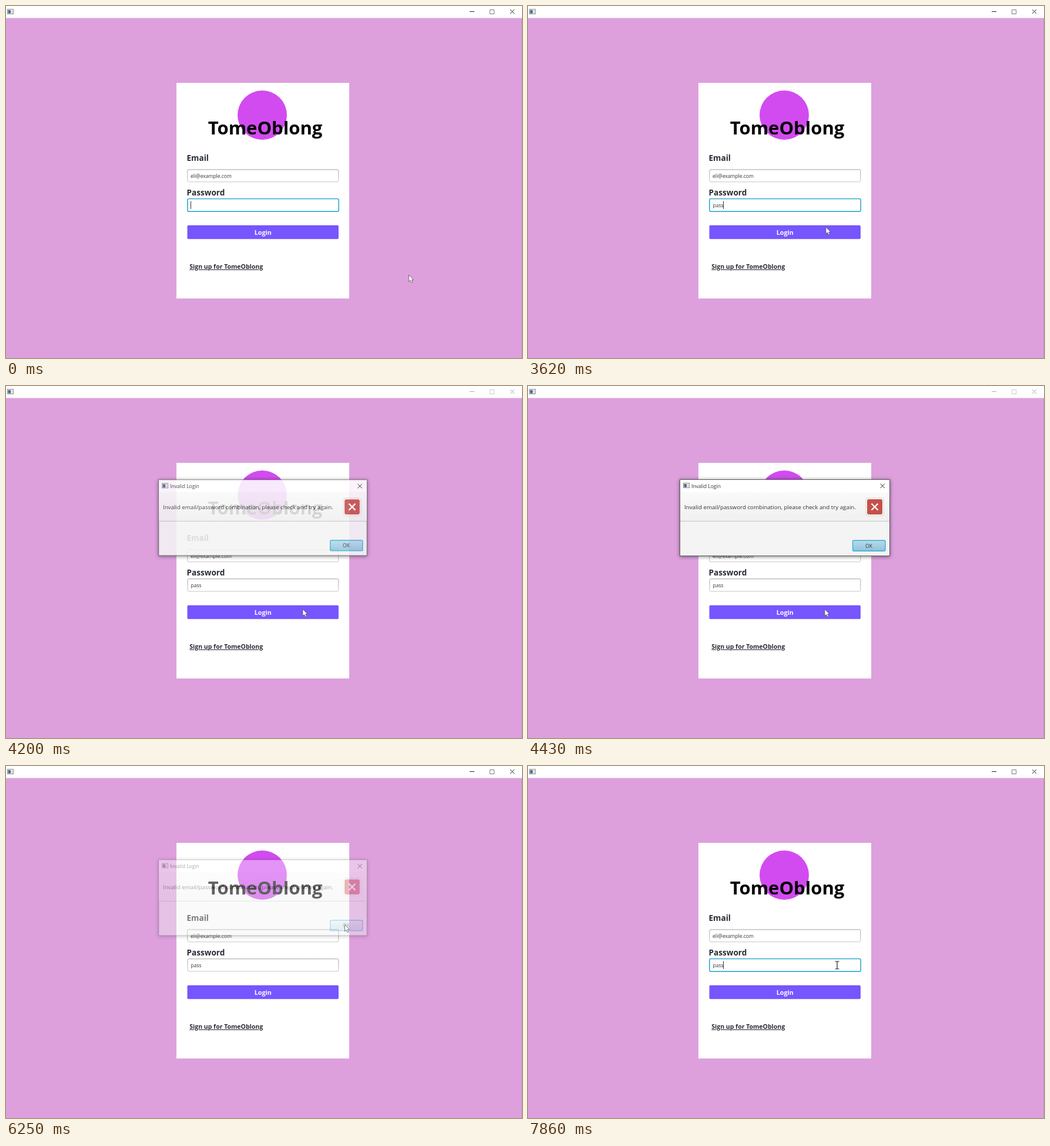
An HTML page that plays this animation: 878 by 600 pixels, repeating every 8 s.

```html
<!DOCTYPE html>
<html lang="en">
<head>
<meta charset="utf-8">
<title>Login</title>
<style>
  html, body { margin: 0; width: 100%; height: 100%; overflow: hidden; background: #dda0dd; }
  svg { display: block; width: 878px; height: 600px; font-family: "Open Sans", "Noto Sans", sans-serif; }
  .bold { font-weight: 700; fill: #282c34; }
  .small { font-size: 8.5px; fill: #333; }
  .line { fill: none; stroke: #222; }
  #dialog { filter: drop-shadow(0 1px 3px rgba(0, 0, 0, .5)); }
</style>
</head>
<body>
<svg viewBox="0 0 878 600">
  <defs>
    <linearGradient id="head" x2="0" y2="1">
      <stop stop-color="#fafafa"/><stop offset="1" stop-color="#f0f0f0"/>
    </linearGradient>
    <linearGradient id="okIdle" x2="0" y2="1">
      <stop stop-color="#b5dcea"/><stop offset="1" stop-color="#91c2da"/>
    </linearGradient>
    <linearGradient id="okHover" x2="0" y2="1">
      <stop stop-color="#d9ecf2"/><stop offset="1" stop-color="#b2d5df"/>
    </linearGradient>
    <linearGradient id="inputEdge" x2="0" y2="1">
      <stop stop-color="#a2a2a2"/><stop offset="1" stop-color="#c6c6c6"/>
    </linearGradient>
    <g id="appIcon">
      <rect x=".5" y=".5" width="10" height="8" fill="#f4f4f4" stroke="#8d8d8d"/>
      <rect x="1.5" y="2" width="4.5" height="5.5" fill="#49688f"/>
      <rect x="7" y="2" width="2" height="5.5" fill="#d5d5d5"/>
    </g>
  </defs>

  <rect width="878" height="600" fill="#dda0dd"/>
  <path d="M877.5 20V600" stroke="#c493c5"/>
  <rect width="878" height="20.5" fill="#fff"/>
  <use href="#appIcon" x="2" y="5"/>
  <g id="winButtons" class="line">
    <path d="M789 9.5h8M858 6l7 7m0-7l-7 7"/>
    <path d="M823.5 6.5h7v7h-7z" stroke-width=".6"/>
  </g>

  <rect x="290" y="131" width="294" height="367.5" fill="#fff"/>
  <circle cx="436" cy="186" r="42" fill="#d24bf0"/>
  <text x="441" y="219" font-size="31" font-weight="700" text-anchor="middle">TomeOblong</text>

  <text class="bold" x="307.5" y="264" font-size="13.6">Email</text>
  <rect x="308.8" y="278.8" width="257" height="21" rx="2" fill="#fff" stroke="url(#inputEdge)"/>
  <path d="M310 280h254.5" stroke="#ececec"/>
  <text class="small" x="314" y="292.7">eli@example.com</text>

  <text class="bold" x="307.5" y="323" font-size="13.6">Password</text>
  <rect x="309" y="328.8" width="256.8" height="21.2" rx="2" fill="#fff" stroke="url(#inputEdge)"/>
  <rect id="ring" x="308.9" y="328.6" width="257.2" height="21.6" rx="2" fill="#fff" stroke="#169fce" stroke-width="1.4"/>
  <text id="typed" class="small" x="314.5" y="342.7"></text>
  <path id="caret" d="M314.5 332.5v13.5" stroke="#333"/>

  <rect x="308.5" y="373.8" width="257.4" height="23.5" rx="2" fill="#7755ff"/>
  <text x="437.3" y="389.8" font-size="10.7" font-weight="700" fill="#fff" text-anchor="middle">Login</text>
  <text class="bold" x="312.3" y="448" font-size="10.5" text-decoration="underline">Sign up for TomeOblong</text>

  <g id="dialog">
    <rect x="258.5" y="159.5" width="357" height="130" fill="#f4f4f4" stroke="#5c5c5c"/>
    <rect x="259" y="160" width="356" height="21" fill="#fff"/>
    <rect x="259" y="181" width="356" height="49" fill="url(#head)"/>
    <path d="M259 230.5h356" stroke="#c2c2c2"/>
    <use href="#appIcon" x="264" y="165"/>
    <text class="small" x="278" y="173.5">Invalid Login</text>
    <path class="line" d="M599.5 166.5l7.5 7.5m0-7.5l-7.5 7.5"/>
    <text x="266" y="210" font-size="9.75" fill="#333">Invalid email/password combination, please check and try again.</text>
    <rect x="575" y="191" width="30" height="30" rx="4" fill="#fff" stroke="#cfcfcf"/>
    <rect x="577" y="193" width="26" height="26" rx="3" fill="#c6504a"/>
    <path d="M584.5 200.5l11 11m0-11l-11 11" stroke="#fff" stroke-width="2.4"/>
    <rect id="ok" x="552.5" y="263.3" width="55.5" height="18" rx="2" stroke="#35add6" stroke-width="1.4"/>
    <text class="small" x="580" y="275.7" text-anchor="middle">OK</text>
  </g>

  <g id="pointer">
    <path id="arrow" d="M.4.4V11.8L3 9.5 5 13.6 7 12.7 5.1 8.8H8.5Z" fill="#fff" stroke="#444" stroke-width=".7"/>
    <path id="beam" class="line" stroke-width="1.2" d="M-3.5-6.5h2.5l1 1 1-1h2.5M0-5.5v11M-3.5 6.5h2.5l1-1 1 1h2.5"/>
  </g>
</svg>
<script>
  const $ = id => document.getElementById(id);
  const set = (id, name, value) => $(id).setAttribute(name, value);
  const show = (id, on) => set(id, "visibility", on ? "visible" : "hidden");
  const easeOut = p => 1 - (1 - p) ** 2;
  const inside = (x, y, left, top, right, bottom) => x > left && x < right && y > top && y < bottom;

  const open = 4200, solid = 4430, shut = 6250, gone = 6420;
  const blur = 4000, click = 7860;
  const keys = [2400, 2580];

  // Pointer glides: start and end in ms, where to, and in how many jumps.
  const home = { x: 685, y: 458 };
  const glides = [
    { start: 200, end: 1190, x: 554, y: 353, jumps: 6 },
    { start: 1380, end: 1800, x: 537, y: 323, jumps: 3 },
    { start: 3220, end: 3790, x: 504.5, y: 380, jumps: 4 },
    { start: 5030, end: 5430, x: 576, y: 270, jumps: 3 },
    { start: 6900, end: 7470, x: 526, y: 339.5, jumps: 4 }
  ];

  function pointerAt(t) {
    let { x, y } = home;
    for (const g of glides) {
      if (t < g.start) break;
      const p = Math.min(1, (t - g.start) / (g.end - g.start));
      const k = easeOut((Math.floor(p * (g.jumps - 1)) + 1) / g.jumps);
      x += (g.x - x) * k;
      y += (g.y - y) * k;
    }
    return { x, y };
  }

  // The caret blinks afresh after each key press or click.
  function caretLit(t) {
    const last = Math.max(...[0, ...keys, click].filter(ms => ms <= t));
    return (t - last) % 900 < 600;
  }

  function drawForm(t) {
    const focus = t < blur || t >= click;
    const pressed = keys.filter(ms => ms <= t).length;
    $("typed").textContent = "pass".slice(0, 2 * pressed);
    set("caret", "transform", `translate(${$("typed").getComputedTextLength()})`);
    show("caret", focus && caretLit(t));
    show("ring", focus);
  }

  function drawDialog(t) {
    const fading = t < solid || t >= shut;
    show("dialog", t >= open && t < gone);
    set("dialog", "opacity", t < solid ? 0.88 : t < shut ? 1 : 0.4);
    set("dialog", "transform", `translate(437 224.5) scale(${fading ? 0.993 : 1}) translate(-437 -224.5)`);
    $("winButtons").style.stroke = t >= open && t < shut ? "#aaa" : "#222";
  }

  function drawPointer(t) {
    const { x, y } = pointerAt(t);
    const beam = inside(x, y, 309, 279, 566, 300) || inside(x, y, 309, 329, 566, 350);
    set("pointer", "transform", `translate(${x} ${y})`);
    show("arrow", !beam);
    show("beam", beam);
    set("ok", "fill", inside(x, y, 552, 263, 608, 282) ? "url(#okHover)" : "url(#okIdle)");
  }

  const start = performance.now();
  function tick() {
    const t = (performance.now() - start) % 8000;
    drawForm(t);
    drawDialog(t);
    drawPointer(t);
    requestAnimationFrame(tick);
  }
  tick();
</script>
</body>
</html>
```
